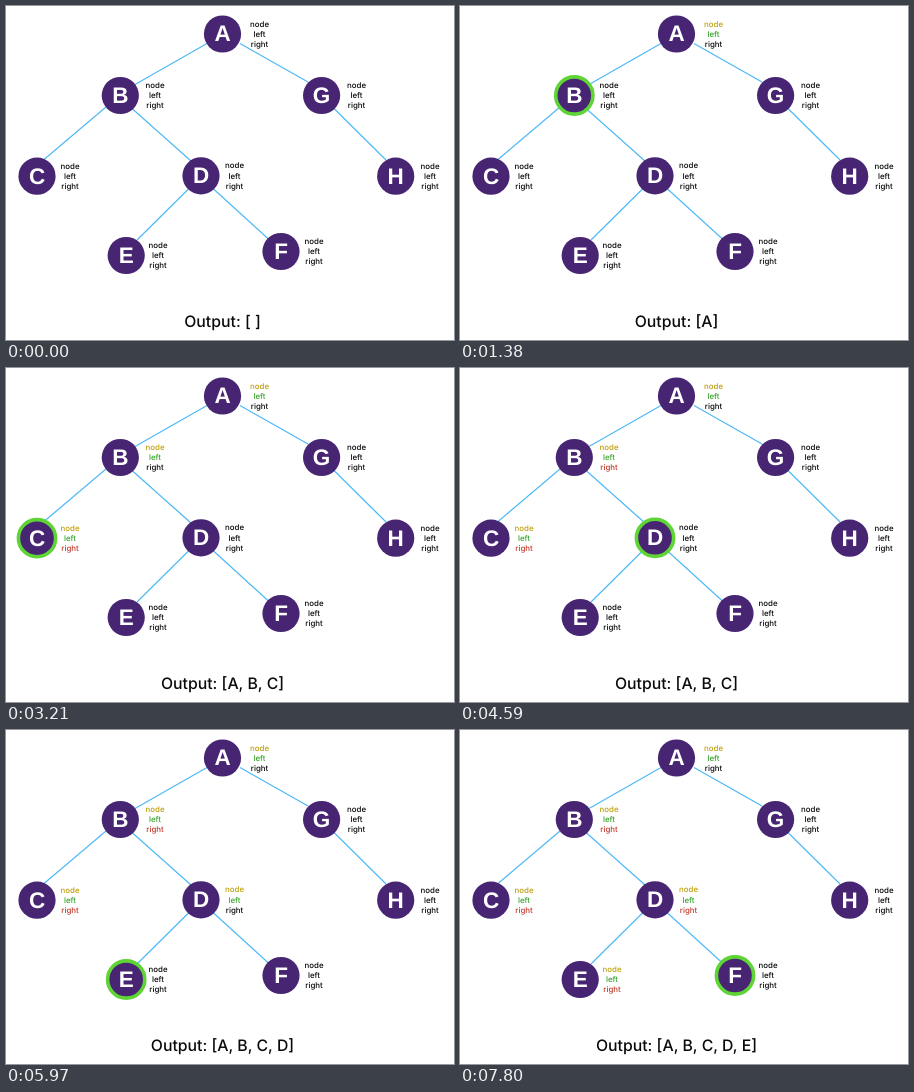
Write an HTML page with a canvas that moves like this. It is 448x334 px and loops after 8000 ms.

```html
<!DOCTYPE html>
<html lang="en">
<head>
<meta charset="utf-8">
<title>Preorder traversal</title>
<style>
  html, body { margin: 0; width: 100%; height: 100%; overflow: hidden; background: #fff; }
  canvas { display: block; }
</style>
</head>
<body>
<canvas id="stage" width="448" height="334"></canvas>
<script>
const ctx = document.getElementById('stage').getContext('2d');
const LOOP = 8000;
const LETTER_FONT = 'bold 22.5px "Liberation Sans", Arial, sans-serif';
const LABEL_FONT = '500 7.9px Inter, sans-serif';
const OUTPUT_FONT = '500 15.8px Inter, sans-serif';
const PURPLE = '#482573', RING = '#5fd435', EDGE = '#4ab8f7', INK = '#0a0a0a';
const LABEL_COLORS = { node: '#bfa00f', left: '#37a42c', right: '#c23b2c' };

// Centre of each node and the x of its labels.
const nodes = {
  A: { x: 216.5, y: 28, labelX: 253.5 },
  B: { x: 114.3, y: 89.5, labelX: 149 },
  C: { x: 31, y: 170.2, labelX: 64 },
  D: { x: 195, y: 169.8, labelX: 228.5 },
  E: { x: 120.2, y: 249.5, labelX: 152 },
  F: { x: 275, y: 245.5, labelX: 308 },
  G: { x: 315.6, y: 89.5, labelX: 350.5 },
  H: { x: 389.7, y: 170.2, labelX: 424 }
};

const edges = [
  [201, 37.5, 129, 78.5], [234, 37.5, 302, 76],
  [100, 101, 38, 153.5], [126, 102.5, 185, 155],
  [183, 182.5, 131, 234], [207, 182.5, 263, 233.5],
  [328, 102.5, 380, 154]
];

// Each step moves the ring to a node and/or lights some of its labels.
const steps = [
  [480, 'A', 'node'], [930, 'A', 'left'],
  [1380, 'B'], [1830, 'B', 'node'], [2310, 'B', 'left'],
  [2760, 'C'], [3210, 'C', 'node', 'left', 'right'],
  [3690, 'B'], [4140, 'B', 'right'],
  [4590, 'D'], [5040, 'D', 'node'], [5520, 'D', 'left'],
  [5970, 'E'], [6420, 'E', 'node', 'left', 'right'],
  [6900, 'D'], [7350, 'D', 'right'],
  [7800, 'F']
];

function stateAt(time) {
  const state = { current: null, lit: new Set(), output: [] };
  for (const [start, name, ...labels] of steps) {
    if (start > time) break;
    state.current = name;
    for (const label of labels) state.lit.add(name + label);
    if (labels.includes('node')) state.output.push(name);
  }
  return state;
}

function text(string, x, y, font, color) {
  ctx.font = font;
  ctx.fillStyle = color;
  ctx.fillText(string, x, y);
}

function drawNode(name, { current, lit }) {
  const { x, y, labelX } = nodes[name];
  ctx.beginPath();
  ctx.arc(x, y, 18.6, 0, 2 * Math.PI);
  ctx.fillStyle = PURPLE;
  ctx.fill();
  if (name === current) {
    ctx.strokeStyle = RING;
    ctx.lineWidth = 3.6;
    ctx.stroke();
  }
  text(name, x, y + 7.4, LETTER_FONT, '#fff');
  Object.keys(LABEL_COLORS).forEach((label, i) => {
    const color = lit.has(name + label) ? LABEL_COLORS[label] : INK;
    text(label, labelX, y - 7.4 + i * 10.1, LABEL_FONT, color);
  });
}

function draw(time) {
  const state = stateAt(time);
  ctx.fillStyle = '#fff';
  ctx.fillRect(0, 0, 448, 334);
  ctx.textAlign = 'center';
  ctx.textRendering = 'geometricPrecision';

  ctx.strokeStyle = EDGE;
  ctx.lineWidth = 1.1;
  for (const [x1, y1, x2, y2] of edges) {
    ctx.beginPath();
    ctx.moveTo(x1, y1);
    ctx.lineTo(x2, y2);
    ctx.stroke();
  }
  for (const name in nodes) drawNode(name, state);

  const output = `Output: [${state.output.join(', ') || ' '}]`;
  text(output, 216.5, 320.7, OUTPUT_FONT, INK);
}

const begin = performance.now();
function tick() {
  draw((performance.now() - begin) % LOOP);
  requestAnimationFrame(tick);
}
tick();
</script>
</body>
</html>
```
